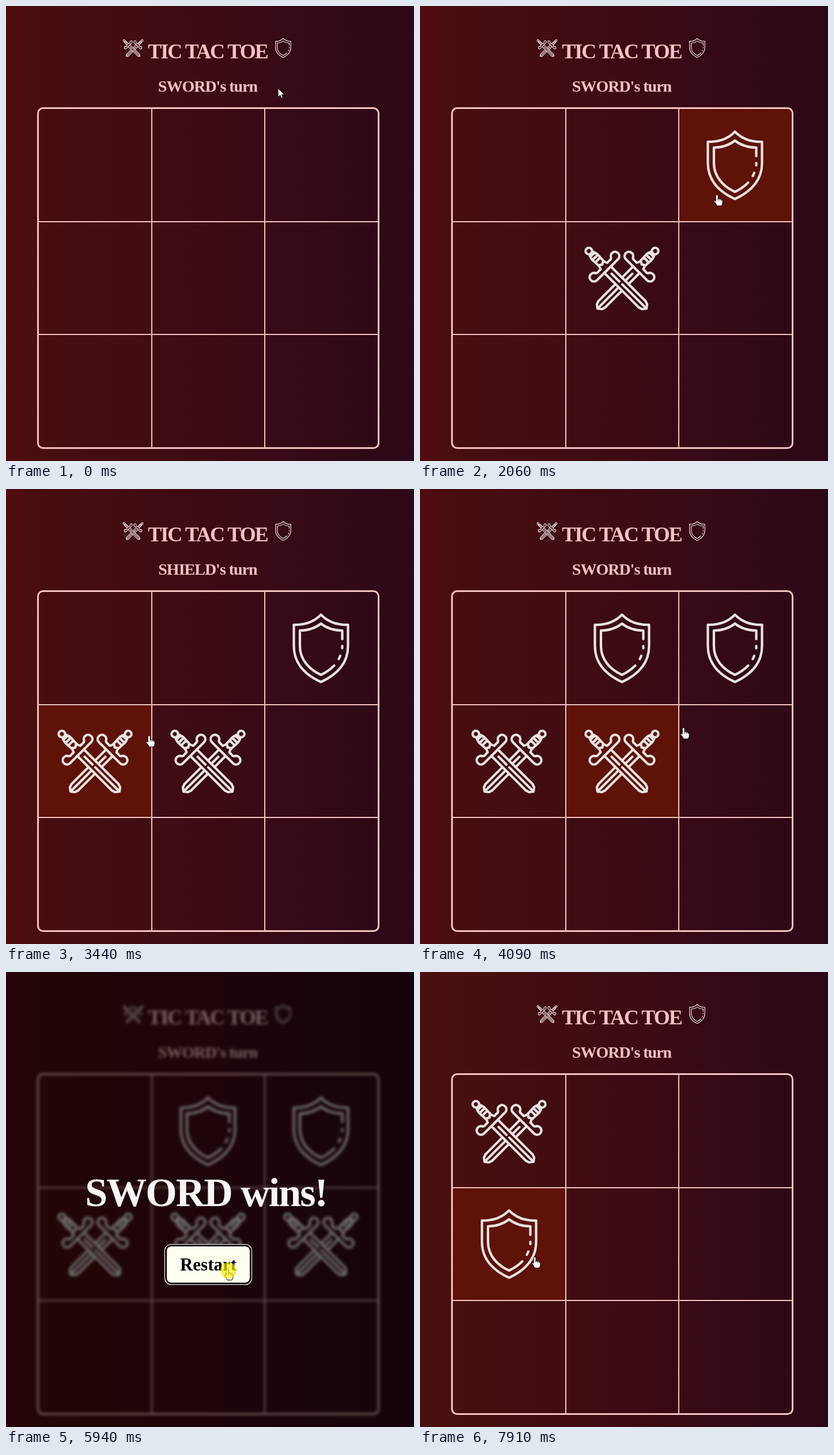
An HTML page for the animation above (7990 ms loop, 708 by 791 pixels).

```html
<!DOCTYPE html>
<html lang="en">
<head>
<meta charset="utf-8">
<title>Tic Tac Toe</title>
<style>
  html, body { margin: 0; width: 100%; height: 100%; overflow: hidden; background: #3c0b14; }
  svg { display: block; width: 708px; height: 791px; }
  text { font-family: "Liberation Serif", "Noto Serif", serif; font-weight: 700; text-anchor: middle; }
  .heading { fill: #f4c2c2; }
  .icon { fill: none; stroke: #e8e4e2; stroke-width: 4.2; stroke-linecap: round; stroke-linejoin: round; }
  .pointer { fill: #fff; stroke: #000; stroke-linejoin: round; }
  .dim { filter: blur(2.8px); }
</style>
</head>
<body>
<svg viewBox="0 0 708 791">
  <defs>
    <linearGradient id="warm">
      <stop offset="0" stop-color="#500c10"/><stop offset=".08" stop-color="#480e10"/>
      <stop offset=".5" stop-color="#3c0b14"/><stop offset="1" stop-color="#2c0818"/>
    </linearGradient>
    <linearGradient id="calm">
      <stop offset="0" stop-color="#4a100e"/><stop offset=".5" stop-color="#3d0b13"/>
      <stop offset="1" stop-color="#2c0818"/>
    </linearGradient>
    <g id="hilt">
      <circle cy="-74" r="5.6"/>
      <path d="M-4-68Q-7-62-6.5-56T-6-44M4-68Q7-62 6.5-56T6-44M-5-65H5M-6.5-58.5H6.5M-6.5-52H6.5"/>
      <path id="guard" d="M0-28H26A7.5 7.5 0 1 0 19-38.5Q17-36 13-37H8L5-44L0-41"/>
      <use href="#guard" transform="scale(-1 1)"/>
    </g>
    <path id="point" d="M-8 57L-6 63L0 67.5L6 63L8 57"/>
    <g id="sword">
      <g transform="rotate(-45) translate(-7.4 0)">
        <use href="#hilt"/><use href="#point"/>
        <path d="M-8-28V57M8-28V57M0-18V1M0 8V64"/>
      </g>
      <g transform="scale(-1 1) rotate(-45) translate(-7.4 0)">
        <use href="#hilt"/><use href="#point"/>
        <path d="M-8-28V-1M8-28V-1M0-18V-1M-8 16V57M8 16V57M0 16V64"/>
      </g>
    </g>
    <g id="shield">
      <path d="M0-58.5Q-18-40-47-41V-4C-47 28-25 47 0 58.5C25 47 47 28 47-4V-41Q18-40 0-58.5Z"/>
      <path d="M37-16V-31Q15-31 0-43Q-15-31-36.500-31V-4C-36.500 20-20 37 0 46Q13 40 23 30M37-4V0M33.500 13L31 18.500"/>
    </g>
  </defs>

  <rect id="back" width="708" height="791"/>
  <g id="game">
    <rect id="hover" width="196" height="196" fill="#5e1208"/>
    <use href="#sword" class="icon" transform="translate(220.500 73) scale(.275)"/>
    <use href="#shield" class="icon" transform="translate(481 73) scale(.282)"/>
    <text class="heading" x="350" y="91" font-size="36" letter-spacing="-2">TIC TAC TOE</text>
    <text id="turn" class="heading" x="350" y="149" font-size="28" letter-spacing="-1"></text>
    <g fill="none" stroke="#f4c2c2">
      <path stroke-width="2" d="M253 178V768M449 178V768M56 375H646M56 571H646"/>
      <rect x="55.500" y="177.500" width="591" height="591" rx="9" stroke-width="3"/>
    </g>
    <g id="marks" class="icon"></g>
  </g>
  <g id="over">
    <rect width="708" height="791" fill="#000" opacity=".51"/>
    <text x="347" y="407" font-size="70" letter-spacing="-2" fill="#f5f5f4">SWORD wins!</text>
    <rect id="ring" x="275.500" y="473.500" width="151" height="70" rx="11" fill="#000" stroke="#fff" stroke-width="1.200"/>
    <rect x="279" y="477" width="144" height="63" rx="8" fill="#fffff0"/>
    <text x="351" y="519" font-size="31">Restart</text>
  </g>
  <g id="cursor">
    <path id="arrow" class="pointer" d="M0 0V15.500L3.600 12.200L6 17.500L8.600 16.400L6.200 11.200H11Z"/>
    <g id="hand" class="pointer">
      <path d="M-2 2Q-2 0 0 0Q2 0 2 2V7Q4.500 6 5 8Q7.500 7 8 9Q10 8.700 10 11V14Q10 17 8 19.500H0Q-1 16-5 12Q-5 9-2 11.500Z"/>
      <path fill="none" d="M2 7V10M5 8V10.500M8 9V11"/>
    </g>
    <circle id="press" cx="2" cy="3" r="14" fill="#f6ee10" opacity=".68"/>
  </g>
</svg>
<script>
const LOOP = 7990, WIN = 4700, RESTART = 6030;
const LEFT = 57, TOP = 179, CELL = 196;
const $ = id => document.getElementById(id);

// start, end, steps, target x, target y, ease-out power (0: ease in and out)
const MOVES = [
  [80, 400, 5, 322, 494, 0],
  [1150, 1550, 6, 515, 325, 0],
  [2060, 2220, 3, 516, 338, 0],
  [2390, 2870, 7, 206, 461, 0],
  [3280, 3855, 8, 356, 346, 0],
  [4090, 4340, 4, 531, 465, 3],
  [4880, 5610, 10, 384, 516, 0],
  [6440, 6840, 6, 165, 316, 2],
  [7180, 7580, 6, 199, 495, 0]
];

// press, release, cell
const CLICKS = [
  [650, 730, 4], [1630, 1710, 2], [2950, 3030, 3], [3938, 4020, 1], [4600, WIN, 5],
  [5940, RESTART, -1], [6937, 7020, 0], [7830, 7910, 3]
];

const ease = (f, power) => power ? 1 - (1 - f) ** power
  : f < .5 ? 2 * f * f : 1 - 2 * (1 - f) ** 2;

// The pointer moves in held steps; lag looks back by a part of a step.
function cursorAt(t, lag = 0) {
  let x = 472, y = 143;
  for (const [start, end, steps, toX, toY, power] of MOVES) {
    if (t < start) break;
    const gap = (end - start) / (steps - 1);
    const step = Math.min(steps, Math.floor((t - start) / gap + .06) + 1);
    const f = ease((step < steps ? step - lag : steps) / steps, power);
    x += (toX - x) * f;
    y += (toY - y) * f;
  }
  return [x, y];
}

const snap = (v, origin) => origin + Math.floor((v - origin) / CELL) * CELL;
const show = (id, on) => $(id).setAttribute("display", on ? "inline" : "none");
const place = (el, x, y) => el.setAttribute("transform", `translate(${x} ${y})`);

let drawn = "";
function drawMarks(cells) {
  if (cells.join() === drawn) return;
  drawn = cells.join();
  $("marks").innerHTML = cells.map((cell, i) => {
    const x = LEFT + (cell % 3 + .5) * CELL - .5;
    const y = TOP + (Math.floor(cell / 3) + .5) * CELL;
    return `<use href="#${i % 2 ? "shield" : "sword"}" transform="translate(${x} ${y})"/>`;
  }).join("");
}

function render(t) {
  const over = t >= WIN && t < RESTART;
  const [x, y] = cursorAt(t);
  const [hoverX, hoverY] = cursorAt(t, .5);
  const cells = CLICKS
    .filter(([, up, cell]) => cell >= 0 && up <= t && (t < RESTART || up > RESTART))
    .map(click => click[2]);
  const onButton = over && x > 278 && x < 424 && y > 477 && y < 540;

  $("back").setAttribute("fill", t < RESTART ? "url(#warm)" : "url(#calm)");
  drawMarks(cells);
  $("turn").textContent = (cells.length % 2 && !over ? "SHIELD" : "SWORD") + "'s turn";

  show("hover", !over && hoverY > TOP);
  place($("hover"), snap(hoverX, LEFT), snap(hoverY, TOP));
  $("game").classList.toggle("dim", over);
  show("over", over);
  show("ring", onButton);

  const hand = over ? onButton : y > TOP;
  place($("cursor"), x, y);
  show("hand", hand);
  show("arrow", !hand);
  show("press", CLICKS.some(([down, up]) => t >= down && t < up));
}

const began = performance.now();
function tick() {
  render((performance.now() - began) % LOOP);
  requestAnimationFrame(tick);
}
tick();
</script>
</body>
</html>
```
